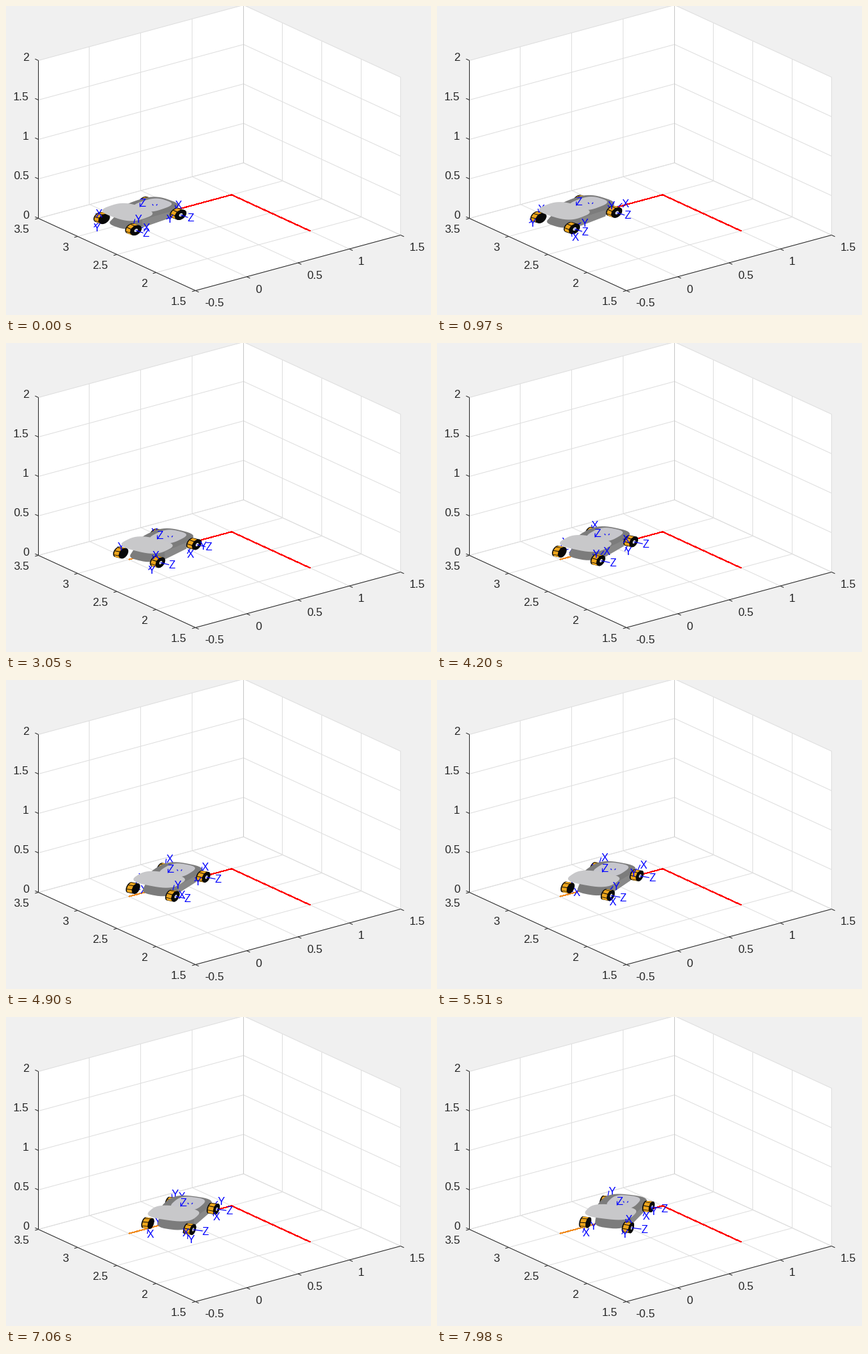
Animation of 636x462 px, one loop 8 s. Source, as a matplotlib script:

```python
import numpy as np
import matplotlib.pyplot as plt
from matplotlib.animation import FuncAnimation
from matplotlib.collections import LineCollection, PolyCollection

W, H, DPI = 636, 462, 100
PX = 72 / DPI
LOOP, INTERVAL = 8000, 40
STEP = 0.0769  # seconds between pose updates

# Screen vectors of the world axes (orthographic view)
ORIGIN = np.array([283.0, 425.0])
VX = np.array([153.5, -41.5])
VY = np.array([-117.5, -54.0])
VZ = np.array([0.0, -118.0])
VIEW = np.array([-0.527, -0.687, 0.5])  # direction to the camera

INK, BLUE, RED, ORANGE = "#262626", "#0000ff", "#ff0000", "#eda51c"
GRID, BLACK = "#dedede", "#080808"

# Car dimensions in world units
MIDDLE, TRACK, BASE = 0.02, 0.165, 0.2425
AXIS, RADIUS = 0.12, 0.06
TURN = np.linspace(0, 2 * np.pi, 40, endpoint=False)

fig = plt.figure(figsize=(W / DPI, H / DPI), dpi=DPI, facecolor="#f0f0f0")
ax = fig.add_axes([0, 0, 1, 1])
ax.set_xlim(-0.5, W - 0.5)
ax.set_ylim(H - 0.5, -0.5)
ax.axis("off")


def project(x, y, z=0.0):
    return ORIGIN + (x + 0.5) * VX + (y - 1.5) * VY + z * VZ


def line(p, q, color, z=1, smooth=True):
    xs = np.array([p[0], q[0]])
    if xs[0] == xs[1]:
        xs = np.floor(xs)
    return ax.plot(xs, [p[1], q[1]], color=color, lw=PX, zorder=z, snap=False,
                   antialiased=smooth, solid_capstyle="butt")[0]


def label(x, y, s, ha="left", color=INK, size=16.8, z=1):
    return ax.text(x, y + 5.8, s, ha=ha, va="baseline", color=color, zorder=z,
                   family="Liberation Sans", fontsize=size * PX)


def draw_box():
    rim = [project(-0.5, 1.5), project(1.5, 1.5), project(1.5, 1.5, 2),
           project(1.5, 3.5, 2), project(-0.5, 3.5, 2), project(-0.5, 3.5)]
    ax.fill(*np.array(rim).T, color="white", lw=0, zorder=0)

    for z in np.arange(5) * 0.5:
        x, y = z - 0.5, z + 1.5
        line(project(x, 1.5), project(x, 3.5), GRID)
        line(project(x, 3.5), project(x, 3.5, 2), GRID)
        line(project(-0.5, y), project(1.5, y), GRID)
        line(project(1.5, y), project(1.5, y, 2), GRID)
        line(project(-0.5, 3.5, z), project(1.5, 3.5, z), GRID)
        line(project(1.5, 3.5, z), project(1.5, 1.5, z), GRID)

        p = project(x, 1.5)
        line(p, p + (5, 2.3), INK)
        label(p[0] + 13.5, p[1] + 18, f"{x:g}")
        p = project(-0.5, y)
        line(p, p + (-5, 1.4), INK)
        label(p[0] - 13.5, p[1] + 15.5, f"{y:g}", "right")
        p = project(-0.5, 3.5, z)
        line(p, p + (-5, -2.3), INK)
        label(p[0] - 14, p[1] - 5, f"{z:g}", "right")

    line(project(1.5, 3.5), project(1.5, 3.5, 2), "#c8c8c8")
    for a, b in zip([rim[4], rim[5], rim[0]], [rim[5], rim[0], rim[1]]):
        line(a, b, INK)


def hull(points):
    """Convex hull by monotone chain."""
    pts = sorted(map(tuple, points))

    def half(seq):
        out = []
        for p in seq:
            while len(out) > 1:
                (ux, uy), (vx, vy) = out[-2], out[-1]
                if (vx - ux) * (p[1] - uy) - (vy - uy) * (p[0] - ux) > 0:
                    break
                out.pop()
            out.append(p)
        return out[:-1]

    return half(pts) + half(pts[::-1])


def panel(r, f, half_r, half_f, z, power=3):
    """Flat superellipse as (right, forward, height) points."""
    def bend(v):
        return np.sign(v) * np.abs(v) ** (2 / power)
    return np.column_stack([r + half_r * bend(np.cos(TURN)),
                            f + half_f * bend(np.sin(TURN)),
                            np.full(TURN.size, z)])


DECK = panel(0.015, -0.13, 0.192, 0.155, 0.16)
HOOD = panel(0.03, 0.13, 0.115, 0.145, 0.15)
SHELL = np.vstack([panel(MIDDLE, 0.13, 0.175, 0.195, 0.13),
                   panel(0.04, 0.0, 0.15, 0.28, 0.045)])
SIDE = np.array([(0.19, f, z) for f, z in
                 [(-0.14, 0.04), (0.15, 0.04), (0.15, 0.12), (-0.14, 0.14)]])


def poly_layer(z):
    return ax.add_collection(PolyCollection([], linewidths=0, zorder=z), autolim=False)


def line_layer(z):
    return ax.add_collection(
        LineCollection([], colors=BLUE, linewidths=1.2 * PX, zorder=z), autolim=False)


def tag(text, z):
    return label(0, 0, text, color=BLUE, size=16, z=z)


def move_tag(text, p):
    text.set_position((p[0] - 0.5, p[1] + 5.8))


class Wheel:
    """Side is +1 on the right, end is +1 at the front."""

    def __init__(self, side, end, start):
        self.side, self.end, self.start = side, end, start
        z = 6 if side > 0 else 2.5 - 0.5 * end
        self.spokes = line_layer(z)
        self.tire = poly_layer(z + 0.1)
        self.axle = line_layer(z + 0.2)
        self.tags = [tag(c, 8 if side > 0 else z + 0.3)
                     for c in ("XYZ" if side > 0 else "XY")]

    def place(self, pose, tau):
        angle = np.radians(self.start - (55 + 21.5 * self.side) * tau)
        hub = pose.at(MIDDLE + self.side * TRACK, self.end * BASE, RADIUS)

        def rim(offset, a, rad=RADIUS):
            a = np.atleast_1d(a)[:, None]
            return (hub + self.side * offset * pose.right
                    + rad * (np.cos(a) * pose.fwd + np.sin(a) * VZ))

        # Tread with the rollers that face the camera
        polys = [hull(np.vstack([rim(-0.02, TURN), rim(0.04, TURN)]))]
        colors = [BLACK]
        for a in angle + np.arange(8) * np.pi / 4:
            if pose.toward * np.cos(a) + VIEW[2] * np.sin(a) > 0:
                polys.append(np.vstack([rim(-0.012, [a - 0.36, a + 0.3]),
                                        rim(0.032, [a + 0.36, a - 0.3])]))
                colors.append(ORANGE)
        if self.side > 0:
            polys += [rim(0.04, TURN), rim(0.04, TURN, 0.02)]
            colors += [BLACK, "#d4d6e0"]
        self.tire.set_verts(polys)
        self.tire.set_facecolor(colors)

        ends = [hub + AXIS * (np.cos(a) * pose.fwd + np.sin(a) * VZ)
                for a in (angle, angle + np.pi / 2)]
        self.spokes.set_segments([[hub, e] for e in ends])
        ends.append(hub + AXIS * pose.right)
        for text, p in zip(self.tags, ends):
            move_tag(text, p)
        if self.side > 0:
            self.axle.set_segments([[hub + 0.04 * pose.right, ends[2]]])


class Pose:
    """Car on the line y = 3, turning slowly as it drives."""

    def __init__(self, tau):
        h = np.radians(6.8 + 3.35 * tau)
        c, s = np.cos(h), np.sin(h)
        self.fwd, self.right = c * VX + s * VY, s * VX - c * VY
        self.toward = VIEW[0] * c + VIEW[1] * s
        self.center = project(0.086 + 0.0557 * tau, 3)

    def at(self, r, f, z):
        return self.center + r * self.right + f * self.fwd + z * VZ

    def shape(self, pts):
        return self.center + pts @ np.array([self.right, self.fwd, VZ])


draw_box()
line(project(0, 3), project(1, 3), RED, 1.2, False)
line(project(1, 3), project(1, 2), RED, 1.2, False)
trail = line(project(0, 3), project(0, 3), "#f08a1e", 1.3, False)

wheels = [Wheel(-1, 1, 243), Wheel(-1, -1, 130), Wheel(1, 1, 105), Wheel(1, -1, -9)]
body = poly_layer(4)
mast = line_layer(7)
mast_tag = tag("Z", 8)


def update(i):
    t = (i + 0.5) * INTERVAL / 1000
    count = max(0, int((t - 0.13) // STEP) + 1)
    tau = 0.053 + STEP * count
    pose = Pose(tau)

    trail.set_data(*np.array([project(0, 3), pose.center]).T)
    body.set_verts([hull(pose.shape(SHELL)), pose.shape(SIDE),
                    pose.shape(HOOD), pose.shape(DECK)])
    body.set_facecolor(["#7c7c7c", "#888888", "#c6c6cc", "#c8c8ca"])
    for wheel in wheels:
        wheel.place(pose, tau)

    # Body frame: the Z axis and the tops of the half-sunk X
    tip = pose.at(MIDDLE, 0, 0.23)
    move_tag(mast_tag, tip)
    nose = pose.at(MIDDLE, AXIS, 0.11)
    mast.set_segments([[pose.at(MIDDLE, 0, 0.18), tip],
                       [nose + (2, -6), nose + (3.5, -4)],
                       [nose + (9.5, -6), nose + (8, -4)]])
    return []


anim = FuncAnimation(fig, update, frames=LOOP // INTERVAL, interval=INTERVAL,
                     init_func=lambda: update(0), repeat=True, repeat_delay=0,
                     blit=False)
plt.show()
```
